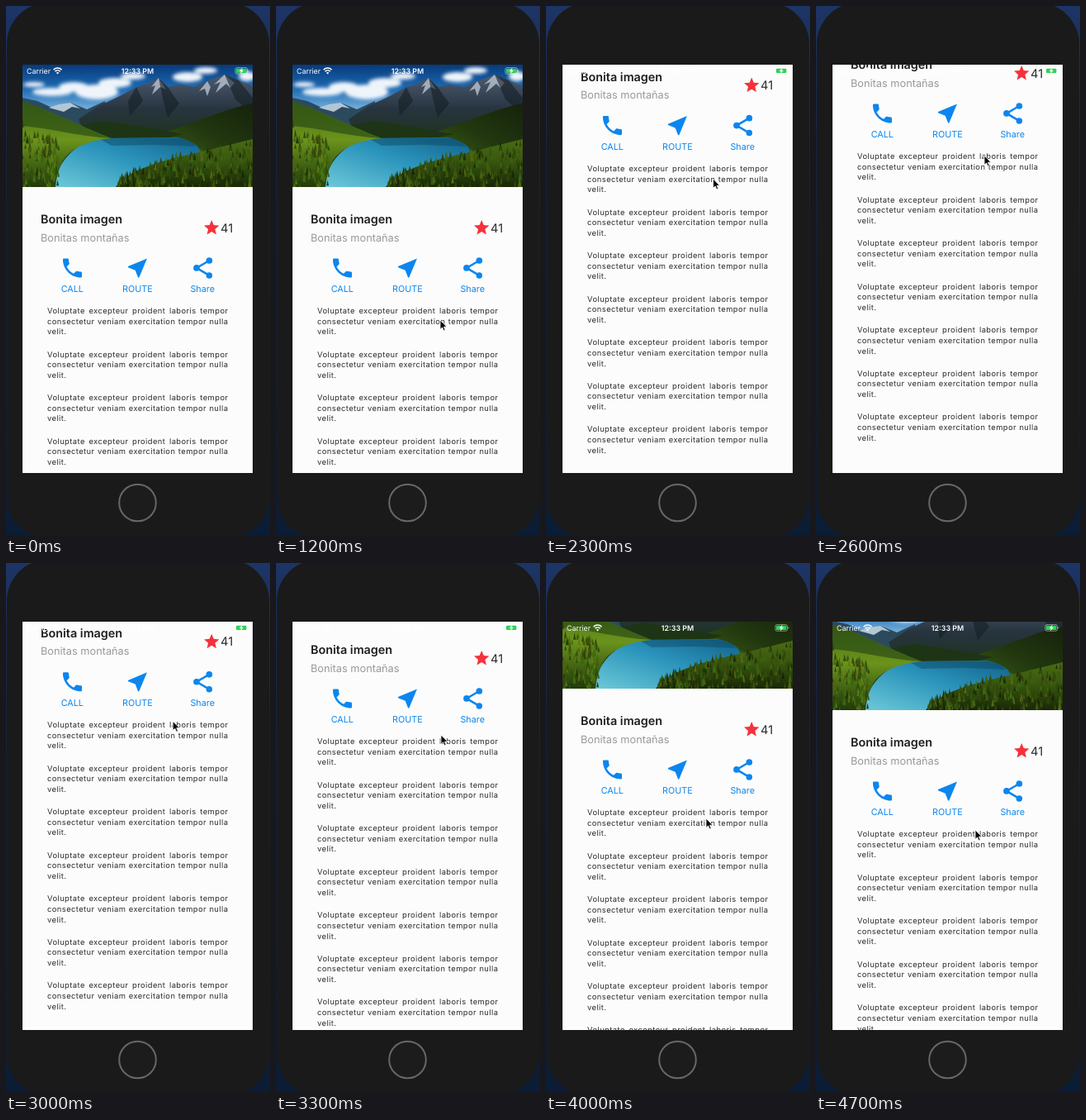
These frames come from a looping animation (320 px wide and 640 px high, 4.8 s). An HTML page:

```html
<!DOCTYPE html>
<html lang="es">
<head>
<meta charset="utf-8">
<title>Bonita imagen</title>
<style>
  html, body { margin: 0; width: 100%; height: 100%; overflow: hidden; background: #0a1a35; }
  .stage { position: relative; width: 320px; height: 640px; overflow: hidden; text-rendering: geometricPrecision;
    background: linear-gradient(#1d3566, #14233f 30%, #141d2e 70%, #0b1d36); font-family: Inter, "Open Sans", sans-serif; }
  .stage > svg, .screen svg { position: absolute; left: 0; top: 0; display: block; }
  .screen { position: absolute; left: 20px; top: 71px; width: 279px; height: 494px; overflow: hidden; background: #fcfcfc; }
  .content { position: absolute; left: 0; top: 0; width: 279px; height: 760px; }
  .text { position: absolute; left: 30px; top: 293px; width: 219.4px; color: #2b2b2b;
    font-size: 9.4px; line-height: 12.65px; letter-spacing: .42px; white-space: nowrap; }
  .text p { margin: 0 0 14.6px; }
  .text span { display: block; }
  .text .full { text-align: justify; text-align-last: justify; }
  .title { font-size: 14.4px; font-weight: 600; fill: #1e1e1e; }
  .subtitle { font-size: 12.75px; fill: #999; }
  .count { font-size: 14.6px; fill: #2b2b2b; }
  .blue { fill: #0c86ef; }
  .label { font-size: 10.8px; text-anchor: middle; }
  .status { font-size: 8.9px; fill: #fff; }
</style>
</head>
<body>
<div class="stage">
  <svg width="320" height="640">
    <rect x="1" y="-4" width="318" height="648" rx="50" fill="#1a1a1a"/>
    <circle cx="159.5" cy="601" r="22.3" fill="#1c1c1c" stroke="#676767" stroke-width="2"/>
  </svg>

  <div class="screen">
    <div class="content" id="content">
      <svg width="279" height="300">
        <defs>
          <linearGradient id="sky" x2="0" y2="1">
            <stop stop-color="#073a7c"/><stop offset=".5" stop-color="#1f6cb4"/><stop offset="1" stop-color="#8cc0e4"/>
          </linearGradient>
          <linearGradient id="rock" x2="0" y2="1">
            <stop stop-color="#4d5b70"/><stop offset=".5" stop-color="#27343f"/><stop offset="1" stop-color="#1d3218"/>
          </linearGradient>
          <linearGradient id="slope" x1="1" x2="0" y2="1">
            <stop stop-color="#16220c"/><stop offset=".5" stop-color="#22380f"/><stop offset="1" stop-color="#3f6418"/>
          </linearGradient>
          <linearGradient id="meadow" x2="0" y2="1">
            <stop stop-color="#4a6f14"/><stop offset=".45" stop-color="#6b931c"/><stop offset="1" stop-color="#1f3a0a"/>
          </linearGradient>
          <linearGradient id="wood" x2="0" y2="1">
            <stop stop-color="#4a6b14"/><stop offset=".5" stop-color="#36540e"/><stop offset="1" stop-color="#172806"/>
          </linearGradient>
          <linearGradient id="lake" x1="1" y1="0" x2="0" y2="1">
            <stop stop-color="#126088"/><stop offset=".45" stop-color="#2a93bb"/><stop offset="1" stop-color="#6fcbd9"/>
          </linearGradient>
          <filter id="soft" x="-20%" y="-50%" width="140%" height="200%"><feGaussianBlur stdDeviation="2"/></filter>
          <clipPath id="photo"><rect width="279" height="148"/></clipPath>
        </defs>
        <g clip-path="url(#photo)">
          <rect width="279" height="148" fill="#213a12"/>
          <rect width="279" height="60" fill="url(#sky)"/>
          <g fill="#eef4fa" filter="url(#soft)">
            <ellipse cx="36" cy="33" rx="24" ry="5"/>
            <ellipse cx="62" cy="27" rx="18" ry="6"/>
            <ellipse cx="90" cy="33" rx="26" ry="9"/>
            <ellipse cx="112" cy="22" rx="20" ry="6"/>
            <ellipse cx="134" cy="14" rx="15" ry="4"/>
            <ellipse cx="14" cy="24" rx="13" ry="3"/>
            <ellipse cx="200" cy="15" rx="18" ry="6"/>
            <ellipse cx="222" cy="7" rx="14" ry="4"/>
            <ellipse cx="272" cy="14" rx="10" ry="6"/>
          </g>
          <path d="M0 40 18 44 36 52 58 46 78 54 100 44V96H0Z" fill="#2c4a5e"/>
          <path d="M32 52 44 48 58 46 70 53 60 51 50 57Z" fill="#b3c6d4"/>
          <path d="M68 66 92 50 116 39 138 27 152 23 165 16 176 27 190 24 208 27 224 20 245 12 262 19 279 26V96H80Z" fill="url(#rock)"/>
          <g fill="#c9d4df" opacity=".7">
            <path d="M165 16 156 27 161 25 157 36 167 27 174 30Z"/>
            <path d="M245 12 232 24 240 21 234 34 247 23 252 28 257 22Z"/>
            <path d="M224 20 214 32 221 29 224 38 228 27Z"/>
          </g>
          <path d="M165 16 176 27 190 47 176 64 170 40ZM245 12 262 19 279 40V60L258 42ZM138 27 146 44 130 62 128 44Z" fill="#141e26" opacity=".6"/>
          <path d="M279 47C246 53 216 68 160 86L205 112 279 116Z" fill="url(#slope)"/>
          <path d="M62 76 98 68 150 76 195 84 160 92 90 92Z" fill="#1d3514"/>
          <path d="M38 148C42 118 62 94 96 89L188 88C218 95 224 110 205 119L113 150Z" fill="url(#lake)"/>
          <path d="M92 89H188Q206 92 210 99L160 97 108 98Z" fill="#0d4560" opacity=".45"/>
          <path d="M0 45C32 54 66 73 108 89 84 91 60 99 49 116 44 126 41 136 40 148H0Z" fill="url(#meadow)"/>
          <path d="M0 45C32 54 66 73 108 89 70 87 34 77 0 74Z" fill="#2c4f14" opacity=".7"/>
          <path d="M279 90C254 96 232 102 200 109 165 118 130 126 113 148H279Z" fill="url(#wood)"/>
          <g id="trees"></g>
        </g>

        <text class="title" x="22" y="192">Bonita imagen</text>
        <text class="subtitle" x="22" y="213.5">Bonitas montañas</text>
        <path transform="translate(218.2 186.1) scale(.92)" fill="#f5323c"
          d="M12 17.27 18.18 21 16.54 13.97 22 9.24 14.81 8.63 12 2 9.19 8.63 2 9.24 7.46 13.97 5.82 21Z"/>
        <text class="count" x="240" y="202.6">41</text>

        <g class="blue">
          <path transform="translate(45.1 230.6) scale(1.28)" d="M6.62 10.79c1.44 2.83 3.76 5.14 6.59 6.59l2.2-2.2c.27-.27.67-.36 1.02-.24 1.12.37 2.33.57 3.57.57.55 0 1 .45 1 1V20c0 .55-.45 1-1 1-9.39 0-17-7.61-17-17 0-.55.45-1 1-1h3.5c.55 0 1 .45 1 1 0 1.25.2 2.45.57 3.57.11.35.03.74-.25 1.02z"/>
          <path transform="translate(124.1 230.6) scale(1.28)" d="M21 3 3 10.53v.98l6.84 2.65L12.48 21h.98z"/>
          <g transform="translate(203.3 230.6) scale(1.28)">
            <path d="M18 5 6 12l12 7" fill="none" stroke="#0c86ef" stroke-width="2"/>
            <circle cx="18" cy="5" r="3"/><circle cx="6" cy="12" r="3"/><circle cx="18" cy="19" r="2.92"/>
          </g>
          <text class="label" x="60.3" y="275">CALL</text>
          <text class="label" x="139.4" y="275">ROUTE</text>
          <text class="label" x="218.2" y="275">Share</text>
        </g>
      </svg>
      <div class="text" id="text"></div>
    </div>

    <svg class="status" width="279" height="20">
      <text x="5" y="10.8">Carrier</text>
      <path d="M37.6 6.2a7 7 0 0 1 10 0M39.5 8.2a4.4 4.4 0 0 1 6.2 0" fill="none" stroke="#fff" stroke-width="1.5"/>
      <path d="M42.6 11.6 40.9 9.8a2.4 2.4 0 0 1 3.4 0Z"/>
      <text x="139.5" y="10.9" text-anchor="middle" font-weight="600">12:33 PM</text>
      <rect x="257.9" y="3.6" width="14.6" height="7.6" rx="2" fill="none" stroke="#fff" stroke-opacity=".6" stroke-width=".8"/>
      <rect x="259" y="4.7" width="12.4" height="5.4" rx="1" fill="#2fd158"/>
      <path d="M273.4 6v2.8q1-.4 1-1.4t-1-1.4" fill-opacity=".6"/>
      <path d="M266.6 3.4 262.6 8h2.3l-1 3.4 4-4.6h-2.3z"/>
    </svg>
  </div>

  <svg width="320" height="640">
    <path id="cursor" d="M0 0V11.2L2.6 8.9 4.3 12.8 6.2 12 4.5 8.2H8Z" fill="#080808" stroke="#fff" stroke-width=".8"/>
  </svg>
</div>

<script>
  const LOOP = 4800, STEP = 100;
  const $ = id => document.getElementById(id);

  // [time, value...]
  const scrollKeys = [[0, 0], [1300, 0], [1900, 127], [2600, 187], [3300, 153], [4000, 67], [4700, 41]];
  const cursorKeys = [[600, 322, 470], [1000, 199, 380], [1300, 199, 380], [1900, 200, 281],
    [2600, 204, 181], [3300, 200, 208], [4000, 194, 309], [4700, 193, 323]];

  $('text').innerHTML = ('<p><span class="full">Voluptate excepteur proident laboris tempor</span>' +
    '<span class="full">consectetur veniam exercitation tempor nulla</span><span>velit.</span></p>').repeat(7);

  let seed = 7;
  const random = () => (seed = seed * 16807 % 2147483647) / 2147483647;

  function plant(count, left, right, top, bottom, light) {
    let svg = '';
    for (let i = 0; i < count; i++) {
      const x = left + random() * (right - left);
      const y = top(x) + (i / count) * (bottom - top(x));
      const h = 5 + random() * 7, w = h * .2;
      const color = `hsl(${72 + random() * 22} 70% ${light + random() * 17}%)`;
      svg += `<path d="M${x} ${y - h * .5}l${w} ${h}h${-2 * w}z" fill="${color}"/>`;
    }
    $('trees').innerHTML += svg;
  }
  plant(150, 0, 44, x => 70 + x * .5, 148, 13);
  plant(260, 116, 279, x => 145 - 53 * Math.sqrt((x - 116) / 163), 148, 8);

  // Monotone cubic through the keys
  function sample(keys, col, t) {
    const last = keys.length - 1;
    if (t <= keys[0][0]) return keys[0][col];
    if (t >= keys[last][0]) return keys[last][col];
    const i = keys.findIndex(k => k[0] > t) - 1;
    const secant = n => (keys[n + 1][col] - keys[n][col]) / (keys[n + 1][0] - keys[n][0]);
    const slope = n => {
      if (n === 0 || n === last) return 0;
      const a = secant(n - 1), b = secant(n);
      return a * b > 0 ? 2 * a * b / (a + b) : 0;
    };
    const span = keys[i + 1][0] - keys[i][0], u = (t - keys[i][0]) / span, v = 1 - u;
    return keys[i][col] * (1 + 2 * u) * v * v + slope(i) * span * u * v * v +
      keys[i + 1][col] * u * u * (3 - 2 * u) - slope(i + 1) * span * u * u * v;
  }

  function draw(now) {
    const t = Math.floor(now % LOOP / STEP) * STEP;
    $('content').style.transform = `translateY(${-sample(scrollKeys, 1, t)}px)`;
    $('cursor').setAttribute('transform', `translate(${sample(cursorKeys, 1, t)} ${sample(cursorKeys, 2, t)})`);
    $('cursor').style.visibility = t > 600 ? 'visible' : 'hidden';
  }

  let start;
  function tick(now) {
    start ??= now;
    draw(now - start);
    requestAnimationFrame(tick);
  }
  draw(0);
  requestAnimationFrame(tick);
</script>
</body>
</html>
```
